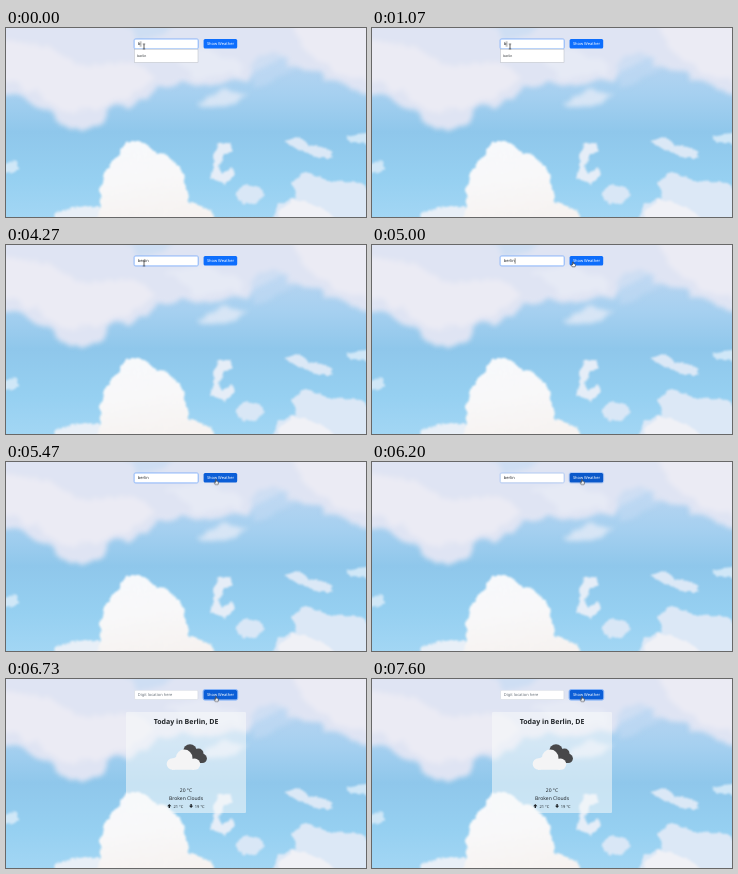
These frames come from a looping animation (360x189 px, 7.94 s). An HTML page:

```html
<!DOCTYPE html>
<html lang="en">
<head>
<meta charset="utf-8">
<title>Weather search</title>
<style>
  html, body { margin: 0; width: 100%; height: 100%; overflow: hidden; background: #9bcfef; }
  svg { position: fixed; inset: 0; width: 100%; height: 100%; display: block; }
  text { font: 4px "Noto Sans", "Open Sans", sans-serif; fill: #212529; text-rendering: geometricPrecision; }
  .mid { text-anchor: middle; }
  .title { font-size: 7px; font-weight: 700; }
  .lead { font-size: 5px; }
  .hint { fill: #6c757d; }
  .option { font-size: 3.3px; }

  .field, .ring, .typed, .caret, .blink, .list, .button, .glow, .hint,
  .card, .panel, .icon, .details, .pointer, .beam, .arrow, .hand {
    animation: 7940ms infinite step-end;
  }

  /* search field */
  .field { animation-name: field; animation-timing-function: linear; }
  .ring { animation-name: ring; animation-timing-function: linear; }
  .typed { animation-name: typed; }
  .caret { animation-name: caret; }
  .blink { animation-name: blink; }
  .list { animation-name: list; animation-timing-function: linear; }
  .hint { animation-name: late; }
  @keyframes field { 0%, 77.2% { stroke: #86b7fe; } 79.1%, 100% { stroke: #ced4da; } }
  @keyframes ring { 0%, 77.2% { opacity: 1; } 79.1%, 100% { opacity: 0; } }
  @keyframes typed {
    0% { width: 2.5px; }
    31.11% { width: 4.75px; }
    33.62% { width: 6.4px; }
    36.14% { width: 7.4px; }
    38.66% { width: 8.45px; }
    41.18% { width: 12px; }
    81.48%, 100% { width: 0; }
  }
  @keyframes caret {
    0% { transform: translateX(2.5px); }
    31.11% { transform: translateX(4.75px); }
    33.62% { transform: translateX(6.4px); }
    36.14% { transform: translateX(7.4px); }
    38.66% { transform: translateX(8.45px); }
    41.18%, 100% { transform: translateX(11px); }
  }
  @keyframes blink {
    0%, 13.47%, 28.58%, 56.29%, 71.4% { opacity: 1; }
    5.91%, 21.03%, 48.74%, 63.85%, 76.44%, 100% { opacity: 0; }
  }
  @keyframes list { 0%, 41.5% { opacity: 1; } 44.45%, 100% { opacity: 0; } }
  @keyframes late { 0% { opacity: 0; } 81.48%, 100% { opacity: 1; } }

  /* button */
  .button { animation-name: button; animation-timing-function: linear; }
  .glow { animation-name: glow; animation-timing-function: linear; }
  @keyframes button {
    0%, 62.9% { fill: #0d6efd; }
    64.9%, 76.44% { fill: #0b5ed7; }
    78%, 79% { fill: #0a58ca; }
    80.5%, 100% { fill: #0b5ed7; }
  }
  @keyframes glow { 0%, 77.2% { opacity: 0; } 79.1%, 100% { opacity: 1; } }

  /* result card */
  .card { animation-name: late; }
  .panel { animation-name: panel; }
  .icon { animation-name: icon; }
  .details { animation-name: details; }
  @keyframes panel { 0% { height: 40.5px; } 84%, 100% { height: 101px; } }
  @keyframes icon { 0% { opacity: 0; } 84%, 100% { opacity: 1; } }
  @keyframes details { 0% { transform: none; } 84%, 100% { transform: translateY(60px); } }

  /* mouse pointer */
  .pointer { animation-name: pointer; animation-timing-function: ease-in-out; }
  .beam { animation-name: beam; }
  .arrow { animation-name: arrow; }
  .hand { animation-name: hand; }
  @keyframes pointer {
    0%, 53.78% { transform: translate(138px, 18.5px); }
    56.29% { transform: translate(139px, 19px); }
    62.5%, 65.49% { transform: translate(201px, 17px); }
    67.13%, 100% { transform: translate(210px, 17.6px); }
  }
  @keyframes beam { 0% { opacity: 1; } 60.7%, 100% { opacity: 0; } }
  @keyframes arrow { 0% { opacity: 0; } 60.7% { opacity: 1; } 61.7%, 100% { opacity: 0; } }
  @keyframes hand { 0% { opacity: 0; } 61.7%, 100% { opacity: 1; } }
</style>
</head>
<body>
<svg viewBox="0 0 360 189" preserveAspectRatio="none">
  <defs>
    <linearGradient id="sky" x2="0" y2="1">
      <stop offset="0" stop-color="#c6d9f2"/>
      <stop offset=".35" stop-color="#a6d0f0"/>
      <stop offset=".55" stop-color="#8fc7eb"/>
      <stop offset=".8" stop-color="#96d0f1"/>
      <stop offset="1" stop-color="#a2d6f4"/>
    </linearGradient>
    <linearGradient id="puff" x2=".2" y2="1">
      <stop offset="0" stop-color="#f7f9fc"/>
      <stop offset=".5" stop-color="#f8f8f9"/>
      <stop offset="1" stop-color="#f6f2f0"/>
    </linearGradient>
    <filter id="soft" x="-20%" y="-20%" width="140%" height="140%" color-interpolation-filters="sRGB">
      <feTurbulence type="fractalNoise" baseFrequency=".06" numOctaves="4" seed="4"/>
      <feDisplacementMap in="SourceGraphic" scale="14" xChannelSelector="R" yChannelSelector="G"/>
      <feGaussianBlur stdDeviation="2.4"/>
    </filter>
    <filter id="crisp" x="-20%" y="-20%" width="140%" height="140%" color-interpolation-filters="sRGB">
      <feTurbulence type="fractalNoise" baseFrequency=".1" numOctaves="3" seed="9"/>
      <feDisplacementMap in="SourceGraphic" scale="6" xChannelSelector="R" yChannelSelector="G"/>
      <feGaussianBlur stdDeviation=".9"/>
    </filter>
    <clipPath id="typed"><rect class="typed" x="131.8" y="11" width="2.5" height="10"/></clipPath>
  </defs>

  <!-- sky and clouds -->
  <rect width="360" height="189" fill="url(#sky)"/>
  <g filter="url(#soft)">
    <path fill="#dfe4f3" d="M-15-15H375V66L345 62 318 48 294 36 272 32 254 40 240 52 205 58 178 54 158 58 138 68 126 77 104 82 92 98 74 104 58 98 40 82 15 70-15 66Z"/>
    <path fill="#ebebf4" d="M-10 10 40 18 78 38 118 34 150 48 126 68 92 80 58 84 28 62-10 50ZM284-10H370V56L334 46 300 26Z"/>
    <path fill="#c3daf3" d="M112-10H172L160 8 132 10ZM244 34 268 24 288 40 270 52 246 58Z" opacity=".6"/>
    <path fill="#e9edf7" d="M160 26 200 22 238 36 232 48 190 50Z" opacity=".8"/>
    <path fill="#d7e5f5" d="M188 72 216 64 242 64 236 74 204 80Z"/>
  </g>
  <g filter="url(#crisp)">
    <path fill="#d0e7f7" d="M-10 136 12 134 14 141-10 150ZM340 108 370 103V116L346 115Z"/>
    <path fill="#dbe8f6" d="M278 113 294 108 304 117 324 121 328 130 312 130 294 123Z"/>
    <path fill="#dce8f6" d="M286 153 300 145 314 150 330 154 346 153 370 164V200H264L272 176 290 170Z"/>
    <path fill="#f0f1f6" d="M270 200 274 182 288 172 306 176 322 184 334 200Z"/>
    <path fill="#e8eff7" d="M46 200 50 184 66 180 84 177 102 182V200Z"/>
    <path fill="url(#puff)" d="M88 200 95 178 94 160 98 146 104 139 114 124 119 114 130 112 142 118 151 126 163 127 170 136 177 146 180 160 183 174 196 178 206 184 210 200Z"/>
    <path fill="#e5edf7" d="M207 126 213 116 225 115 226 122 217 127 212 137 216 145 226 139 228 146 221 157 211 153 205 151 208 139Z"/>
    <path fill="#d9e7f6" d="M230 163 240 156 252 158 259 167 252 174 240 177 232 173Z"/>
  </g>

  <!-- search field -->
  <rect class="ring" x="127.9" y="10.7" width="64.6" height="10.5" rx="1.9" fill="none" stroke="#0d6efd" stroke-opacity=".25"/>
  <rect class="field" x="128.5" y="11.3" width="63.4" height="9.3" rx="1.4" fill="#fff" stroke="#86b7fe" stroke-width=".5"/>
  <text class="hint" x="131.8" y="17.4">Digit location here</text>
  <text x="131.8" y="17.4" clip-path="url(#typed)">berlin</text>
  <g class="caret"><rect class="blink" x="131.8" y="13.3" width=".5" height="5.4" fill="#111"/></g>
  <g class="list">
    <rect x="128.4" y="21.2" width="63.6" height="13.3" fill="#fff" stroke="#b5bac2" stroke-width=".5"/>
    <text class="option" x="131.2" y="28.7">berlin</text>
  </g>

  <!-- button -->
  <rect class="glow" x="197.1" y="10.5" width="34.6" height="10.6" rx="1.9" fill="none" stroke="#3184fd" stroke-opacity=".5"/>
  <rect class="button" x="197.6" y="11" width="33.6" height="9.6" rx="1.5" fill="#0d6efd"/>
  <text class="mid" x="214.5" y="17.4" style="fill:#fff">Show Weather</text>

  <!-- result card -->
  <g class="card">
    <rect class="panel" x="120" y="33" width="120" height="40.5" rx="1" fill="#f8f9fa" fill-opacity=".55"/>
    <text class="mid title" x="180" y="45">Today in Berlin, DE</text>
    <g class="icon">
      <g fill="#48484a">
        <circle cx="184" cy="72" r="6.8"/><circle cx="192.5" cy="74.5" r="5"/>
        <circle cx="196.3" cy="79.4" r="4.6"/><path d="M180 74H194L196 84H180Z"/>
      </g>
      <g fill="#f4f4f5">
        <circle cx="178.2" cy="78.7" r="8.2"/><circle cx="166.5" cy="85" r="5.8"/>
        <circle cx="188.6" cy="85.2" r="5.6"/><path d="M166 80 174 76 188 80V90.8H166Z"/>
      </g>
    </g>
    <g class="details">
      <text class="mid lead" x="180" y="52.8">20 °C</text>
      <text class="mid lead" x="180" y="60.8">Broken Clouds</text>
      <path id="up" d="M163.3 65 165.4 67.2H164V69H162.6V67.2H161.2Z" fill="#212529"/>
      <text x="167.4" y="68.5">21 °C</text>
      <use href="#up" transform="rotate(180 174.2 67)"/>
      <text x="188.8" y="68.5">19 °C</text>
    </g>
  </g>

  <!-- mouse pointer -->
  <g class="pointer" stroke-linejoin="round">
    <path class="beam" d="M-1.2-2.5Q0-2.5 0-1.8 0-2.5 1.2-2.5M0-1.8V1.8M-1.2 2.5Q0 2.5 0 1.8 0 2.5 1.2 2.5" fill="none" stroke="#222" stroke-width=".7"/>
    <path class="arrow" d="M0 0V4.3L1 3.4 1.7 4.9 2.4 4.6 1.7 3.1H3Z" fill="#111" stroke="#fff" stroke-width=".4"/>
    <path class="hand" d="M-.5 0Q0-.6.5 0V1.7L2.2 2.1Q2.7 2.3 2.6 3L2.1 4.8H-.8L-2 2.9Q-1.7 2.2-.5 3Z" fill="#fff" stroke="#111" stroke-width=".5"/>
  </g>
</svg>
</body>
</html>
```
